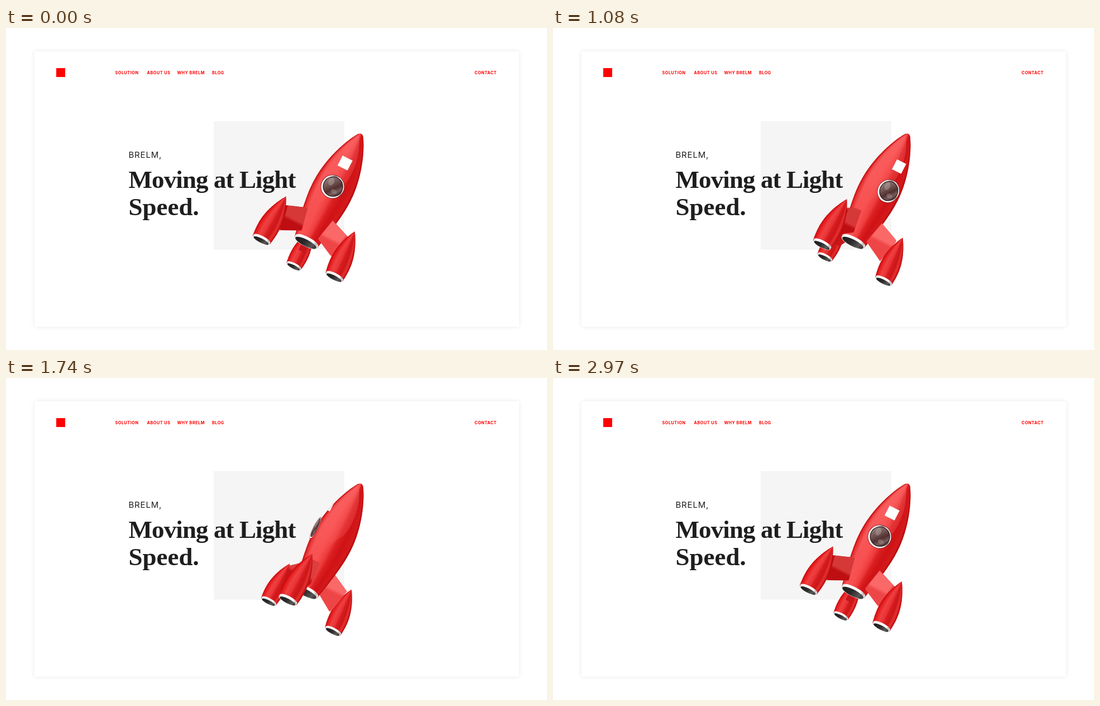
These frames come from a looping animation (969x578 px, 3.57 s). An HTML page with a canvas:

```html
<!DOCTYPE html>
<html lang="en">
<head>
<meta charset="utf-8">
<title>Rocket landing page</title>
<style>
  html, body { margin: 0; width: 100%; height: 100%; overflow: hidden; background: #fff; }
  .card { position: absolute; left: 51px; top: 42px; width: 868px; height: 494px;
    background: #fff; box-shadow: 0 0 8px rgba(0, 0, 0, .09); }
  svg, canvas { position: absolute; left: 0; top: 0; width: 969px; height: 578px; }
  .nav { font: 700 7.3px Inter, sans-serif; letter-spacing: .5px; fill: #f00; }
  .lead { font: 400 15px Inter, sans-serif; letter-spacing: .8px; fill: #1e1e1e; }
  .head { font: 700 45px "Liberation Serif", serif; fill: #1e1e1e; }
</style>
</head>
<body>
<div class="card"></div>
<svg viewBox="0 0 969 578">
  <rect x="372" y="167" width="234" height="231" fill="#f5f5f5"/>
  <rect x="90" y="72" width="16" height="16" fill="#f00"/>
  <g class="nav">
    <text x="195.5" y="83.3">SOLUTION</text>
    <text x="252.5" y="83.3">ABOUT US</text>
    <text x="306.5" y="83.3">WHY BRELM</text>
    <text x="369" y="83.3">BLOG</text>
    <text x="879" y="83.3" text-anchor="end">CONTACT</text>
  </g>
  <text class="lead" x="219.5" y="233">BRELM,</text>
  <text class="head" x="219.5" y="287" letter-spacing="-.9">Moving at Light</text>
  <text class="head" x="219.5" y="336">Speed.</text>
</svg>
<canvas id="stage"></canvas>
<script>
const W = 969, H = 578, LOOP = 3570, TAU = Math.PI * 2;
const canvas = document.getElementById('stage');
const ctx = canvas.getContext('2d');
const dpr = window.devicePixelRatio || 1;
canvas.width = W * dpr;
canvas.height = H * dpr;

const clamp = x => Math.max(0, Math.min(1, x));
const rad = d => d * Math.PI / 180;

// Samples one cubic as [half width, height along the axis]
function curve(x0, y0, x1, y1, x2, y2, x3, y3, n = 36) {
  return Array.from({ length: n + 1 }, (_, i) => {
    const t = i / n, s = 1 - t;
    const mix = (a, b, c, d) => a*s*s*s + 3*b*s*s*t + 3*c*s*t*t + d*t*t*t;
    return [mix(x0, x1, x2, x3), mix(y0, y1, y2, y3)];
  });
}
const BODY = [
  ...curve(22.5, 0, 32, -45, 37.5, -75, 37.5, -103),
  ...curve(37.5, -103, 37.5, -150, 18.5, -196, 5, -216),
  [3, -218], [0, -219]
];
const POD = curve(17, 0, 22, -28, 21, -55, 0, -91);

function ramp(stops, x0, y0, x1, y1) {
  const g = ctx.createLinearGradient(x0, y0, x1, y1);
  stops.forEach(([at, c]) => g.addColorStop(at, c));
  return g;
}
const BODY_RED = [[0, '#c00c0e'], [.05, '#e63132'], [.14, '#f65354'], [.36, '#f84f50'],
  [.52, '#ee3e3f'], [.62, '#dc2022'], [.78, '#cf1215'], [.94, '#d41a1c'], [1, '#b2080a']];
const POD_RED = [[0, '#c80a0c'], [.1, '#e61d1f'], [.28, '#ee4143'], [.46, '#ea3335'],
  [.56, '#d61e20'], [.74, '#cb1518'], [.87, '#e63031'], [1, '#b80a0c']];

function outline(shape) {
  ctx.beginPath();
  shape.forEach(([x, y]) => ctx.lineTo(-x, y));
  [...shape].reverse().forEach(([x, y]) => ctx.lineTo(x, y));
  ctx.closePath();
}

// Turned solid: thin slices share one ramp scaled to the local width
function turned(shape, stops) {
  ctx.save();
  outline(shape);
  ctx.clip();
  ctx.fillStyle = ramp(stops, -1, 0, 1, 0);
  for (let i = 1; i < shape.length; i++) {
    const [x0, y0] = shape[i - 1], [x1, y1] = shape[i];
    ctx.save();
    ctx.scale(Math.max(.5, (x0 + x1) / 2), 1);
    ctx.fillRect(-1.5, y1 - .8, 3, y0 - y1 + 1.6);
    ctx.restore();
  }
  ctx.restore();
}

function oval(x, y, rx, ry, fill) {
  ctx.beginPath();
  ctx.ellipse(x, y, rx, ry, 0, 0, TAU);
  ctx.fillStyle = fill;
  ctx.fill();
}

function nozzle(rx, ry, band) {
  const chrome = ramp([[0, '#ddd'], [.15, '#fff'], [.75, '#fff'], [.9, '#bbb'], [1, '#eee']], -rx, 0, rx, 0);
  oval(0, -band, rx + .4, ry, chrome);
  ctx.fillRect(-rx, -band, rx * 2, band);
  oval(0, 0, rx, ry, chrome);
  oval(.3, .5, rx - 1.6, ry - 1, ramp([[0, '#1c1c1c'], [.45, '#2b2929'], [.75, '#5b5757'], [1, '#222']], -rx, -ry, rx, ry));
}

function quad(points, fill) {
  ctx.beginPath();
  points.forEach(p => ctx.lineTo(...p));
  ctx.closePath();
  ctx.fillStyle = fill;
  ctx.fill();
}

function strut(a, s) {
  const sin = Math.sin(a), cos = Math.cos(a), thick = 7;
  const plate = side => [[33, -53], [72, -37], [62, 7], [23, -13]].map(([r, v]) => [
    s * (r * sin + side * thick * cos),
    v - .17 * (r * cos - side * thick * sin)
  ]);
  const away = Math.acos(Math.cos(a + rad(40)));
  const light = cos < -.3 ? .15 : clamp((away - rad(20)) / rad(45));
  const tint = (d, l) => `rgb(${d.map((c, i) => Math.round(c + (l[i] - c) * light))})`;
  const top = tint([214, 56, 56], [250, 104, 104]);
  const low = tint([190, 14, 18], [238, 70, 71]);
  const face = ramp([[0, top], [.45, top], [.55, low], [1, low]], 0, -58, 0, 8);
  const near = sin > 0 ? -1 : 1;
  const p = plate(-near), q = plate(near);
  quad(p, low);
  quad([p[0], p[1], q[1], q[0]], top);
  quad([p[2], p[3], q[3], q[2]], low);
  quad(q, face);
}

function pod(a, s) {
  const k = Math.sin(a);
  ctx.save();
  ctx.translate(85 * s * k, 38 - 10.5 * Math.cos(a));
  ctx.scale(s, s);
  ctx.save();
  ctx.transform(1, 0, k * .052, 1, 0, 0);
  turned(POD, POD_RED);
  ctx.restore();
  nozzle(16.5, 5, 3);
  ctx.restore();
}

function fin(a) {
  const near = Math.cos(a), s = .94 + .11 * near;
  const parts = near > 0 ? [strut, pod] : [pod, strut];
  parts.forEach(draw => draw(a, s));
}

function porthole(a) {
  const c = Math.cos(a);
  if (c < .1) return;
  ctx.save();
  ctx.translate(38 * Math.sin(a), -111);
  ctx.scale(Math.max(c, .2), 1);
  oval(0, 0, 21.5, 21.5, '#7d1416');
  oval(0, 0, 20.7, 20.7, ramp([[0, '#fff'], [.55, '#f4eeee'], [.72, '#9c8c8c'], [.85, '#fff'], [1, '#ddd']], -18, 16, 18, -16));
  oval(.5, -.5, 18.2, 18.2, '#2b1718');
  oval(.5, -.5, 17, 17, ramp([[0, '#8f7d7c'], [.35, '#6f5150'], [.6, '#51302f'], [.8, '#745b5a'], [1, '#463030']], -14, -10, 14, 12));
  ctx.globalAlpha = .3;
  oval(-6, -7, 5, 7, '#d8cccb');
  oval(6, 7, 6, 4, '#c4b0af');
  ctx.restore();
}

// White square wrapped on the hull
function emblem(a) {
  if (Math.cos(a) < -.3) return;
  const r = 32, half = Math.asin(10 / r);
  const edge = b => r * Math.sin(Math.max(-TAU / 4, Math.min(TAU / 4, b)));
  const a0 = Math.atan2(Math.sin(a), Math.cos(a));
  const left = edge(a0 - half), right = edge(a0 + half);
  ctx.fillStyle = '#fff';
  ctx.fillRect(left, -169, right - left, 20);
}

function hull(turn) {
  const angle = turn - rad(4);
  turned(BODY, BODY_RED);
  ctx.save();
  outline(BODY);
  ctx.clip();
  // Broad soft reflection on the lit side
  ctx.beginPath();
  ctx.moveTo(-3, -214);
  ctx.bezierCurveTo(16, -188, 22, -150, 14, -122);
  ctx.bezierCurveTo(4, -104, -8, -90, -11, -45);
  ctx.bezierCurveTo(-26, -70, -34, -100, -30, -140);
  ctx.bezierCurveTo(-26, -170, -14, -196, -3, -214);
  ctx.fillStyle = ramp([[0, 'rgba(255,130,130,.28)'], [.6, 'rgba(255,110,110,.22)'], [1, 'rgba(255,90,90,0)']], 0, -214, 0, -45);
  ctx.fill();
  emblem(angle);
  ctx.restore();
  porthole(angle);
  nozzle(22.5, 7, 3.5);
}

function rocket(turn) {
  const fins = [-60, 60, 180].map(d => rad(d) + turn).sort((a, b) => Math.cos(a) - Math.cos(b));
  ctx.save();
  ctx.translate(537, 385);
  ctx.rotate(rad(27));
  fins.filter(a => Math.cos(a) <= 0).forEach(fin);
  hull(turn);
  fins.filter(a => Math.cos(a) > 0).forEach(fin);
  ctx.restore();
}

// One full turn from 600 to 2430 ms, cubic in and out, in 30 ms steps
function turnAt(t) {
  const step = Math.floor((t - 600) / 30 + 1e-6);
  const p = clamp((step + .25) / 61);
  const e = p < .5 ? 4 * p ** 3 : 1 - 4 * (1 - p) ** 3;
  return e * TAU;
}

let start;
function frame(now) {
  start ??= now;
  ctx.setTransform(dpr, 0, 0, dpr, 0, 0);
  ctx.clearRect(0, 0, W, H);
  rocket(turnAt((now - start) % LOOP));
  requestAnimationFrame(frame);
}
requestAnimationFrame(frame);
</script>
</body>
</html>
```
